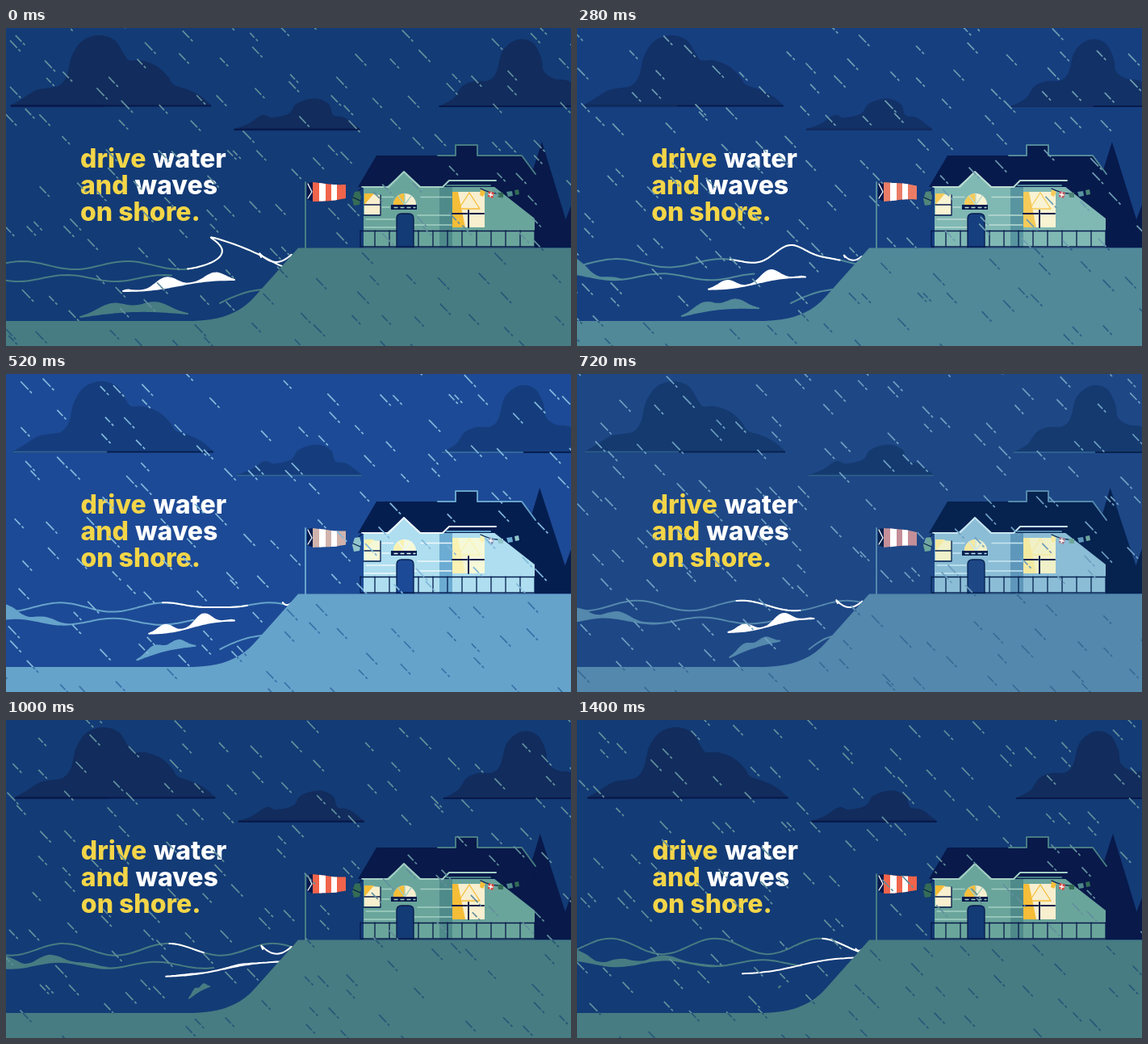
Recreate the animation shown at these times as an HTML page. Size 700 by 394 pixels, loop 1440 ms.

```html
<!DOCTYPE html>
<html lang="en">
<head>
<meta charset="utf-8">
<title>Storm on the shore</title>
<style>
  html, body { margin: 0; width: 100%; height: 100%; overflow: hidden; background: #133b76; }
  svg { display: block; width: 100%; height: 100%; }
  text { font: 800 32px Inter, "Open Sans", sans-serif; fill: #fff; }
  .yellow { fill: #f3d548; }
  .sky { fill: var(--sky); }
  .cloud { fill: var(--cloud); }
  .land { fill: var(--land); }
  .roof { fill: var(--roof); }
  .wall { fill: var(--wall); }
  .shade { fill: var(--shade); }
  .gold { fill: var(--gold); }
  .cream { fill: var(--cream); }
  .sock { fill: var(--sock); }
  .green { fill: var(--green); }
  .red { fill: var(--red); }
  .foam { fill: #fff; }
  .line { stroke-width: 2; stroke-linecap: round; stroke-linejoin: round; }
  .open { fill: none; }
  .teal { stroke: var(--land); }
  .white { stroke: #fff; }
  .ink { stroke: var(--roof); }
  .trim { stroke: var(--trim); }
  .rim { stroke: var(--rim); }
  .lamp { stroke: var(--gold); }
  .thin { stroke-width: 1.3; }
  .rain { stroke: var(--rain); stroke-width: 1.7; stroke-linecap: butt; }
  .wet { stroke: var(--wet); stroke-width: 1.7; stroke-linecap: butt; }
</style>
</head>
<body>
<svg id="stage" viewBox="0 0 700 394" preserveAspectRatio="none">
  <defs>
    <path id="ground" d="M0 363H225C252 363 284 360 308 333L362 272.500H700V394H0Z"/>
    <clipPath id="onLand"><use href="#ground"/></clipPath>
  </defs>
  <rect class="sky" width="700" height="394"/>

  <g id="clouds">
    <g id="cloudA"><path class="line ink" d="M7 96.500H254"/><path class="line rim" d="M7 96.500H122"/></g>
    <g id="cloudB"><path class="line ink" d="M284 125.800H438"/><path class="line rim" d="M284 125.800H438"/></g>
    <g id="cloudC"><path class="line ink" d="M538 97H740"/><path class="line rim" d="M538 97H638"/></g>
  </g>

  <g id="words">
    <text x="92" y="173"><tspan class="yellow">drive</tspan> <tspan dx="1.500">water</tspan></text>
    <text x="92" y="206"><tspan class="yellow">and</tspan> <tspan dx="1">waves</tspan></text>
    <text class="yellow" x="92" y="238.500">on shore.</text>
  </g>

  <g id="trees" class="roof">
    <path d="M663 141L704 272H622Z"/>
    <path d="M736 124V272H680Z"/>
  </g>

  <g id="house">
    <path class="wall" d="M443 196H655V272H443Z"/>
    <path class="shade" d="M537 196H553V272H537Z"/>
    <path class="line open trim thin" d="M446 237H482M466 209.500H480M466 222H475M444 247H484M506 244H552M510 232H552M514 209.500H552"/>
    <path class="roof" d="M604 196H655V236Z"/>
    <path class="roof" d="M459 158H557V145H584V158H639L656 197H436Z"/>
    <path class="roof" d="M639 158L656 178L655 198Z"/>
    <path class="line open teal" d="M535 158H557V145H584V158H639L656 181"/>
    <path class="wall" d="M470 198L493 178L516 198V203H470Z"/>
    <path class="line open trim" d="M441 197H474L493 178L513 197H541L549 189H607"/>
    <path class="line open teal" d="M546 195H600"/>

    <path class="cream" d="M444 205L464 207V231H444Z"/>
    <path class="gold" d="M444 205H456L444 219Z"/>
    <path class="line open ink thin" d="M444 219H463M443 232H464V207"/>

    <path class="cream" d="M480 219a14 14 0 0 1 28 0Z"/>
    <path class="gold" d="M480 219a14 14 0 0 1 14 -14V219Z"/>
    <path class="line open trim thin" d="M486 208L494 219L502 208M494 219V205"/>
    <path class="roof" d="M477 219H509V225H477Z"/>
    <path class="line open trim thin" stroke-dasharray="4 4" d="M481 222.500H507"/>
    <path class="sky line ink thin" d="M484 272V236Q484 230 490 230H499Q505 230 505 236V272"/>

    <path class="cream" d="M553 203H593V247H553Z"/>
    <path class="gold" d="M553 203H560L569 247H553Z"/>
    <path class="line open lamp thin" d="M574 204L561 224H587Z"/>
    <path class="line open ink" d="M573 226V247M553 230H571M575 230H592"/>

    <path class="line open ink thin" d="M588 199Q612 211 637 200"/>
    <path class="gold" d="M588 200l6 3l-3 6l-4 -2Z"/>
    <path class="red" d="M598 202l7 2l-2 7l-6 -2Z"/>
    <path class="line open white thin" d="M601 204l-1 5M598 206l5 1"/>
    <path class="green" d="M609 204l7 0l0 6l-6 0ZM630 201l5 -1l1 6l-5 1Z"/>
    <path class="shade" d="M620 203l7 -1l1 6l-6 1Z"/>

    <path class="line open ink thin" d="M441 198L435 204"/>
    <path class="green" d="M432 203L438 202L440 209L438 219L431 220L429 212Z"/>
    <path class="line open ink thin" d="M430 210L439 214"/>
    <path id="rails" class="line open ink thin"/>
  </g>

  <path class="line teal" d="M371 191V273"/>
  <path class="roof" d="M373 192L381 191V215L373 212Z"/>
  <path class="line open white thin" d="M374 193L379 203L374 211"/>
  <path id="sockBody" class="sock"/>
  <path id="sockBands" class="foam"/>

  <path id="lowFoam" class="line teal land"/>
  <path id="backwash" class="line open teal"/>
  <path id="midWave" class="line teal land"/>
  <path id="whiteFoam" class="line white foam"/>
  <path id="swell" class="line open teal"/>
  <path id="crest" class="line open white"/>
  <path id="splash" class="line open white"/>

  <path id="rainSky" class="line open rain"/>
  <use href="#ground" class="land"/>
  <g clip-path="url(#onLand)"><path id="rainLand" class="line open wet"/></g>
</svg>

<script>
const LOOP = 1440, STEP = 40;
const { PI, sin, cos, exp, min, max, round } = Math;
const $ = id => document.getElementById(id);
const set = (id, d) => $(id).setAttribute('d', d);
const lerp = (a, b, k) => a + (b - a) * k;
const ease = (a, b, t) => {
  const k = min(1, max(0, (t - a) / (b - a)));
  return k * k * (3 - 2 * k);
};
const pairs = a => a.flatMap((v, i) => i % 2 ? [] : [[v, a[i + 1]]]);
const sample = (n, f) => Array.from({ length: n + 1 }, (_, i) => f(i / n));

// Smooth curve through points.
function curve(p, head = 'M') {
  const f = v => v.toFixed(1);
  let d = head + p[0].map(f).join(' ');
  for (let i = 0; i < p.length - 1; i++) {
    const a = p[i - 1] || p[i], b = p[i], c = p[i + 1], e = p[i + 2] || c;
    d += 'C' + [b[0] + (c[0] - a[0]) / 6, b[1] + (c[1] - a[1]) / 6,
      c[0] - (e[0] - b[0]) / 6, c[1] - (e[1] - b[1]) / 6, ...c].map(f).join(' ');
  }
  return d;
}
const band = (low, top) => curve(low) + curve(top.reverse(), 'L') + 'Z';

// Colours at night, in the flash and in the afterglow.
const palette = {
  sky: ['133b76', '1d4b9e', '1e4786'], cloud: ['112c5d', '153f84', '143a70'],
  land: ['477c82', '6fb1db', '5488ac'], roof: ['08194a', '051c50', '06224f'],
  wall: ['6aa59c', 'c0effc', '8bbdd6'], shade: ['4f8a8b', '73b6de', '5f97bb'],
  trim: ['a3cfc4', 'ffffff', 'c8e6f2'], rim: ['08194a', '34699f', '2d5f90'],
  gold: ['f6bd38', 'fbf6bc', 'f4e9a0'], cream: ['f8efcf', 'f8fde0', 'f0f1c8'],
  sock: ['f0644b', 'd8c5b6', 'c48f98'], green: ['346c55', 'a4d4e2', '6fa79c'],
  red: ['d9483f', '6f9cc4', 'a4788c'], rain: ['628f9c', '8cc6ea', '6d9fc0'],
  wet: ['275778', '3973ad', '3a6a98']
};
const NIGHT = 0, FLASH = 1, GLOW = 2;
const moods = [[0, NIGHT], [260, NIGHT], [340, FLASH], [420, FLASH], [720, GLOW], [940, NIGHT], [LOOP, NIGHT]];
const mix = (a, b, k) => 'rgb(' + [0, 2, 4].map(i =>
  round(lerp(parseInt(a.slice(i, i + 2), 16), parseInt(b.slice(i, i + 2), 16), k))) + ')';

function light(t) {
  const i = moods.findIndex(m => m[0] > t);
  const [[t0, from], [t1, to]] = [moods[i - 1], moods[i]];
  for (const name in palette) {
    const c = palette[name];
    $('stage').style.setProperty('--' + name, mix(c[from], c[to], (t - t0) / (t1 - t0)));
  }
}

function drawSwell(t, u) {
  const curl = 1 - ease(0, 240, t), late = ease(1000, 1200, t);
  const peak = 150 + 55 * sin(PI * t / 1600);
  const breaker = 26 * (1 - ease(240, 640, t)) + 6 * curl;
  // The breaker leans back over its own face while it curls.
  const at = x => {
    const lift = exp(-(((x - 262 - 40 * curl) / 28) ** 2));
    const roll = (5 + 5 * u * u) * cos(2 * PI * (x - peak) / 130);
    return [x - 46 * curl * lift * lift, 294 - 14 * u - roll - breaker * lift];
  };
  const run = (a, b) => curve(sample(40, p => at(lerp(a, b, p))));
  set('swell', run(0, 360));
  set('crest', run(185 + 40 * curl + 25 * u + 95 * late, lerp(357 - .112 * t, 354, late)));

  const s = Math.abs(cos(PI * t / 900));
  set('splash', curve(sample(12, p => [
    lerp(352 - 36 * s, 352, p) - 9 * s * sin(2 * PI * p),
    284 + 2 * p - 5 * s * sin(3 * PI * p)
  ])));
}

function drawFoam(t, u) {
  const curl = 1 - ease(0, 240, t);
  // Foam lies along a bottom edge and rises by a thickness above it.
  const ribbon = (x0, x1, y, h) => {
    const low = sample(24, p => [lerp(x0, x1, p), y(p, lerp(x0, x1, p))]);
    return band(low, low.map(([x, v], i) => [x, v - h(i / 24, x)]));
  };

  const reach = 25 + 160 * u, depth = 20 * ease(0, 300, t) * (1 - .4 * u);
  set('midWave', ribbon(0, 205 + 75 * u,
    (p, x) => 310 - 9 * u - 4 * cos(2 * PI * (x - 75 - .11 * t) / 120),
    (p, x) => depth * max(0, 1 - x / reach) * (.6 + .4 * cos(2 * PI * x / 55))));

  const froth = 13 * (1 - ease(600, 1100, t)), shift = .17 - .26 * curl;
  set('whiteFoam', ribbon(145 + 60 * sin(u * PI / 2), 283 + 60 * ease(600, 1050, t),
    p => lerp(326 - 12 * u, 312 - 18 * u, p) + 2 * sin(2 * PI * p),
    p => froth * sin(PI * p) ** .5 * (.5 + .5 * cos(2 * PI * (p - shift) / .47)) ** 1.3));

  set('lowFoam', ribbon(min(250, 92 + .135 * t), 225 + 27 * ease(360, 760, t),
    p => lerp(358 - 28 * u * u, 354 - 24 * ease(0, 800, t), p) - 5 * (1 - u) * sin(PI * p),
    p => 13 * (1 - u * u) * sin(PI * p) * (.8 + .3 * cos(4 * PI * (p - .25)))));

  const x0 = 265 + 55 * ease(500, 1000, t);
  set('backwash', curve(sample(8, p => [lerp(x0, 327, p), 341 - 18 * p - 4 * sin(PI * p)])));
}

function drawSock(t) {
  const edge = (x, head, tail) => {
    const k = (x - 380) / 41;
    return [x, lerp(head, tail, k) + 1.3 * k * sin(4 * k - 6 * PI * t / LOOP)];
  };
  const cloth = (a, b) => band(sample(3, p => edge(lerp(a, b, p), 215, 212)),
    sample(3, p => edge(lerp(a, b, p), 191, 195)));
  set('sockBody', cloth(380, 421));
  set('sockBands', cloth(388, 396) + cloth(403, 410));
}

// Rain falls a whole number of wraps per loop.
const W = 760, H = 454, COLS = 19, ROWS = 10;
let seed = 11;
const rand = () => (seed = seed * 16807 % 2147483647) / 2147483647;
const drops = Array.from({ length: COLS * ROWS }, (_, i) => ({
  x: (i % COLS + rand()) * W / COLS,
  y: (Math.floor(i / COLS) + rand()) * H / ROWS,
  len: 8 + rand() * 7
}));

function drawRain(u) {
  const d = drops.map(({ x, y, len }) => {
    const px = (x + u * W) % W - 30, py = (y + u * 2 * H) % H - 30;
    const dash = (a, b) => `M${px + a * .69} ${py + a * .72}L${px + b * .69} ${py + b * .72}`;
    return dash(0, len) + dash(len + 2.5, len + 6);
  }).join('');
  set('rainSky', d);
  set('rainLand', d);
}

// Outlines of the clouds, as a few points each.
const puffs = {
  cloudA: [6, 96, 20, 88, 38, 77, 55, 74, 67, 71, 76, 59, 82, 35, 95, 16, 115, 9, 135, 15, 147, 33,
    153, 40, 168, 40, 187, 47, 201, 60, 208, 70, 225, 76, 241, 84, 255, 96],
  cloudB: [283, 125, 300, 119, 318, 108, 330, 111, 351, 106, 359, 95, 372, 89,
    388, 88, 401, 95, 406, 108, 420, 111, 439, 125],
  cloudC: [537, 97, 555, 87, 566, 72, 580, 66, 598, 65, 608, 55, 615, 30, 628, 17, 642, 14, 655, 20,
    664, 38, 667, 54, 680, 63, 700, 67, 742, 97]
};
for (const id in puffs) {
  const puff = document.createElementNS('http://www.w3.org/2000/svg', 'path');
  puff.setAttribute('class', 'cloud');
  puff.setAttribute('d', curve(pairs(puffs[id])) + 'Z');
  $(id).prepend(puff);
}

// Railing, open at the door.
let rails = 'M439 251.500H484M505 251.500H655M439 271H655';
for (let x = 439; x <= 655; x += 18) if (x < 484 || x > 505) rails += `M${x} 251V271`;
set('rails', rails);

function draw() {
  const t = Math.floor(performance.now() % LOOP / STEP) * STEP, u = t / LOOP;
  light(t);
  $('clouds').setAttribute('transform', `translate(${u * 7.5 - .5} 0)`);
  $('words').setAttribute('transform', `translate(${u * 1.2} 0)`);
  const lean = .75 * cos(2 * PI * u) - .3;
  $('trees').setAttribute('transform', `translate(0 272) skewX(${-lean}) translate(0 -272)`);
  drawSwell(t, u);
  drawFoam(t, u);
  drawSock(t);
  drawRain(u);
  requestAnimationFrame(draw);
}
draw();
</script>
</body>
</html>
```
